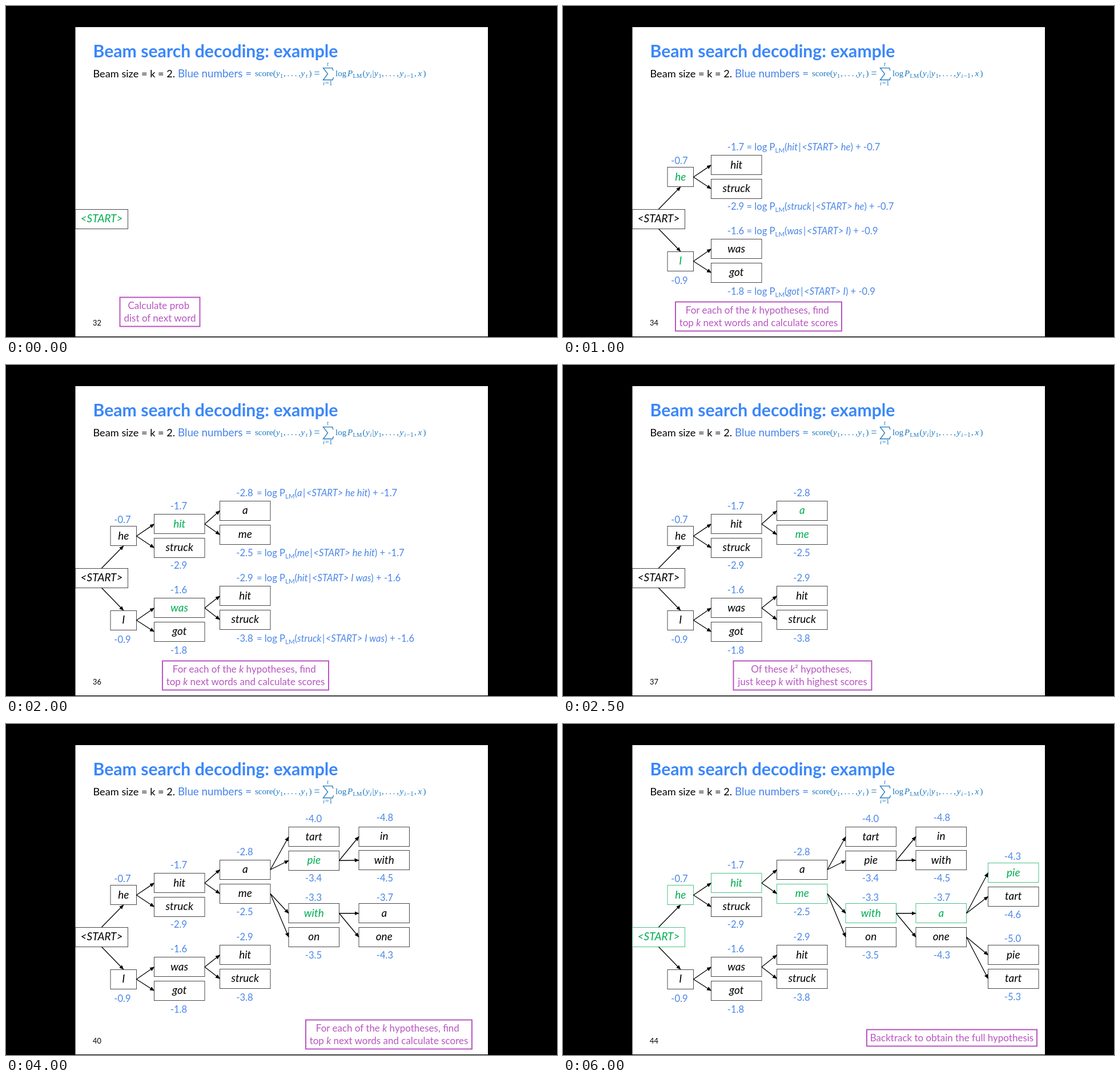
An HTML page that plays this animation: 965x580 px, repeating every 6500 ms.

```html
<!DOCTYPE html>
<html lang="en">
<head>
<meta charset="utf-8">
<title>Beam search decoding</title>
<style>
  html, body { margin: 0; width: 100%; height: 100%; overflow: hidden; background: #000; }
  svg { display: block; font-family: Lato, sans-serif; }
  text { white-space: pre; }
  .mid { text-anchor: middle; }
  .it { font-style: italic; }
  .math { font-family: "Liberation Serif", serif; }
  .dots { letter-spacing: 2.8px; }
</style>
</head>
<body>
<svg width="965" height="580" viewBox="0 0 965 580">
  <defs>
    <marker id="head" markerUnits="userSpaceOnUse" markerWidth="8" markerHeight="8" refX="7.5" refY="3.5" orient="auto">
      <path d="M0 0L8 3.5L0 7Z"/>
    </marker>
  </defs>
  <path fill="#fff" d="M121.5 37H844V579H121.5Z"/>
  <text x="152.5" y="90" font-size="30.2" font-weight="700" fill="#3a87fa">Beam search decoding: example</text>
  <text x="152.5" y="124.5" font-size="18.2">Beam size = k = 2.</text>
  <text x="301" y="124.5" font-size="18.8" fill="#4583ea">Blue numbers =</text>
  <g id="formula" class="math"></g>
  <path fill="none" stroke="#1c78be" stroke-width="1.3" d="M573 113L571.5 108.7H555.5L563.5 119L555.5 129.5H572L573.5 125"/>
  <g id="slide"></g>
</svg>
<script>
const STEP = 500, LOOP = 6500;
const BLUE = "#4a86e8", GREEN = "#00ae50", PURPLE = "#b955c2";
const START = "&lt;START&gt;";
const BOX_H = 34.5;

// Columns of the tree: left edge, width, centre of the scores
const columns = [[121.5, 92], [183, 45.5, 204], [259.5, 88.5, 302.5], [374.5, 88.5, 418],
                 [495, 88.5, 538.5], [618, 88.5, 663.5], [744.5, 88.5, 787.5]];

// Word, column, top, parent, score, middle of the score
const nodes = [
  [START, 0, 356],
  ["he", 1, 282.5, 0, "-0.7", 271], ["I", 1, 430, 0, "-0.9", 481],
  ["hit", 2, 261.5, 1, "-1.7", 247], ["struck", 2, 303, 1, "-2.9", 351],
  ["was", 2, 408.5, 2, "-1.6", 394], ["got", 2, 450, 2, "-1.8", 500],
  ["a", 3, 238, 3, "-2.8", 223.5], ["me", 3, 280, 3, "-2.5", 329],
  ["hit", 3, 387.5, 5, "-2.9", 373], ["struck", 3, 429, 5, "-3.8", 478.5],
  ["tart", 4, 180.5, 7, "-4.0", 166], ["pie", 4, 222, 7, "-3.4", 269.5],
  ["with", 4, 314.5, 8, "-3.3", 304], ["on", 4, 356, 8, "-3.5", 405],
  ["in", 5, 180, 12, "-4.8", 164], ["with", 5, 221.5, 12, "-4.5", 270],
  ["a", 5, 314.5, 13, "-3.7", 304], ["one", 5, 356, 13, "-4.3", 405],
  ["pie", 6, 243.5, 17, "-4.3", 231.5], ["tart", 6, 285, 17, "-4.6", 334],
  ["pie", 6, 387.5, 18, "-5.0", 376], ["tart", 6, 429, 18, "-5.3", 477.5]
].map(([word, col, y, parent, score, scoreY]) => {
  const [x, w, scoreX] = columns[col];
  return { word, col, x, y, w, parent, score, scoreX, scoreY, cx: x + w / 2, cy: y + BOX_H / 2 };
});

const expand = ["For each of the *k* hypotheses, find ", "top *k* next words and calculate scores"];
const keep = ["Of these *k*² hypotheses, ", "just keep *k* with highest scores"];

// Per step: green nodes, then centre, top and width of the note, then its lines
const steps = [
  [[0], 269.5, 510.5, 140, "Calculate prob ", "dist of next word"],
  [[0], 280, 510.5, 162, "Take top *k* words ", "and compute scores"],
  [[1, 2], 342.5, 518.5, 291, ...expand],
  [[3, 5], 342.5, 518.5, 242, ...keep],
  [[3, 5], 419.5, 518.5, 291, ...expand],
  [[7, 8], 419.5, 518.5, 242, ...keep],
  [[7, 8], 550.5, 518.5, 291, ...expand],
  [[12, 13], 550.5, 518.5, 242, ...keep],
  [[12, 13], 670.5, 518.5, 291, ...expand],
  [[17, 18], 670.5, 518.5, 242, ...keep],
  [[17, 18], 687.5, 518.5, 291, ...expand],
  [[19], 681, 535.5, 276, "This is the top-scoring hypothesis!"],
  [[0, 1, 3, 8, 13, 17, 19], 681, 535.5, 298, "Backtrack to obtain the full hypothesis"]
];

const text = (x, y, size, fill, body, cls = "mid") =>
  `<text x="${x}" y="${y}" font-size="${size}" fill="${fill}" class="${cls}">${body}</text>`;
const rect = (x, y, w, h, stroke, width) =>
  `<rect x="${x}" y="${y}" width="${w}" height="${h}" fill="#fff" stroke="${stroke}" stroke-width="${width}"/>`;
const italic = s => `<tspan class="it">${s}</tspan>`;

function history(node) {
  const words = [];
  for (let p = nodes[node.parent]; p; p = nodes[p.parent]) words.unshift(p.word);
  return words.join(" ");
}

function equation(node) {
  const base = nodes[node.parent].score;
  return `= log P<tspan font-size="11.5" dy="4">LM</tspan><tspan dy="-4">(</tspan>` +
    italic(`${node.word}<tspan dx="1.5">|</tspan><tspan dx="1.5">${history(node)}</tspan>`) +
    ")" + (base ? ` + ${base}` : "");
}

function drawArrow(node) {
  const from = nodes[node.parent];
  const up = node.cy < from.cy;
  const [x1, y1, x2, y2] = node.col > 1
    ? [from.x + from.w, from.cy, node.x, node.cy]
    : [from.cx, up ? from.y : from.y + BOX_H, node.cx, up ? node.y + BOX_H : node.y];
  return `<path d="M${x1} ${y1}L${x2} ${y2}" stroke="#000" stroke-width="1.3" marker-end="url(#head)"/>`;
}

function drawNode(node, green, framed) {
  return rect(node.x, Math.floor(node.y) + 0.5, node.w, 34, green && framed ? "#4cc287" : "#484848", 1) +
    text(node.cx, node.cy + 6, 19, green ? GREEN : "#000", node.word, "mid it");
}

function drawScore(node, full) {
  const y = node.scoreY + 6;
  return text(node.scoreX, y, 16.6, BLUE, node.score) +
    (full ? text(node.scoreX + (node.col > 2 ? 21 : 19), y, 16.6, BLUE, equation(node), "") : "");
}

function drawNote(cx, y, w, lines) {
  const h = lines.length > 1 ? 51 : 29;
  return rect(cx - w / 2, y, w, h, PURPLE, 2) + lines.map((line, i) =>
    text(cx, y + 20.5 + i * 21.5, 17, PURPLE, line.replace(/\*(.)\*/g, (_, k) => italic(k)))).join("");
}

function drawSlide(step) {
  const [green, cx, y, w, ...note] = steps[step];
  const depth = step && Math.min(6, 1 + (step >> 1));
  const full = step === 1 || step === 2 || step === 4;
  const shown = nodes.filter(n => n.col <= depth);
  const children = shown.slice(1);
  return shown.map(n => drawNode(n, green.includes(nodes.indexOf(n)), step > 10)).join("") +
    children.map(drawArrow).join("") +
    children.map(n => drawScore(n, full && n.col === depth)).join("") +
    drawNote(cx, y, w, note) +
    text(159.5, 560, 12.8, "#000", 32 + step);
}

// Formula pieces: text, x, class, then baseline and size where not on the main line
const SUB = [126, 10.5];
const ELLIPSIS = ",...,";
document.getElementById("formula").innerHTML = [
  ["score(", 436], ["y", 473, "it"], ["1", 480, "", ...SUB], [ELLIPSIS, 486, "dots"],
  ["y", 516.5, "it"], ["t", 525, "it", ...SUB], [")", 530.5], ["=", 539.5, "", 124, 18],
  ["t", 562, "it", 105, 11], ["i", 555, "it", 139, 11], ["=1", 559, "", 139, 12],
  ["log", 577], ["P", 598, "it"], ["LM", 607.5, "", ...SUB], ["(", 624.5],
  ["y", 630, "it"], ["i", 637.5, "it", ...SUB], ["|", 641.5], ["y", 645, "it"], ["1", 652.5, "", ...SUB],
  [ELLIPSIS, 658, "dots"], ["y", 689.5, "it"], ["i", 697.5, "it", ...SUB], ["−1", 701.5, "", 126, 11.5],
  [",", 715], ["x", 721.5, "it"], [")", 730.5]
].map(([s, x, cls = "", y = 123, size = 15]) => text(x, y, size, "#1c78be", s, cls)).join("");

const slide = document.getElementById("slide");
let current = -1;
function tick() {
  const step = Math.floor(performance.now() % LOOP / STEP);
  if (step !== current) slide.innerHTML = drawSlide(current = step);
  requestAnimationFrame(tick);
}
tick();
</script>
</body>
</html>
```
